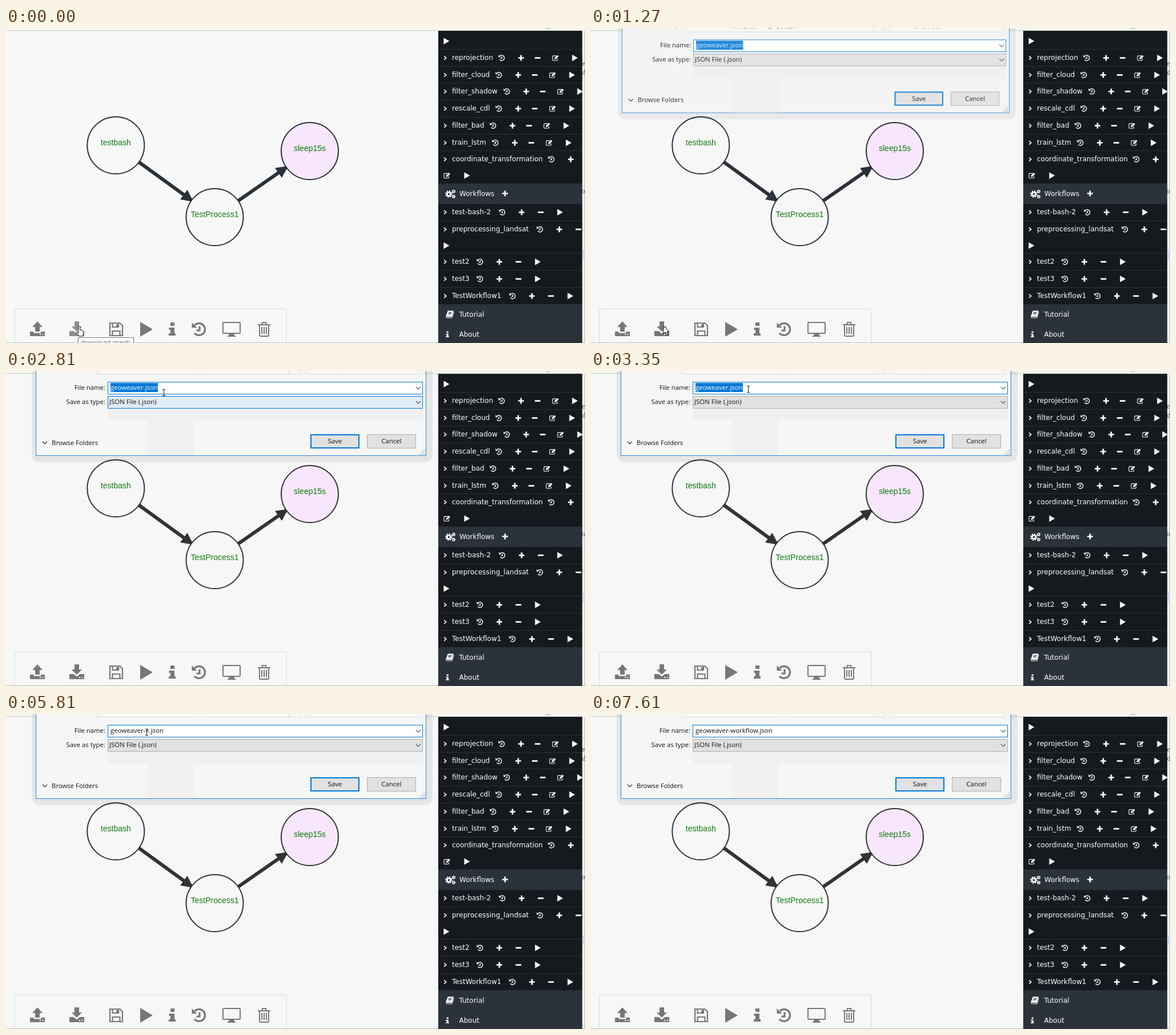
An HTML page with a canvas for the animation above (8 s loop, 1014 by 553 pixels).

```html
<!DOCTYPE html>
<html lang="en">
<head>
<meta charset="utf-8">
<title>Workflow export</title>
<style>
html, body { margin: 0; width: 100%; height: 100%; overflow: hidden; }
canvas { display: block; }
</style>
</head>
<body>
<canvas id="stage" width="1014" height="553"></canvas>
<script>
const ctx = document.getElementById('stage').getContext('2d');
const LOOP = 8000;
const SIDE = '12px "DejaVu Sans", sans-serif';
const DIALOG = '11.4px "Open Sans", "Noto Sans CJK SC", sans-serif';
const NODE = '14px "Liberation Sans", Arial, sans-serif';
const BLUE = '#0078d7';

// Icon shapes about (0,0): f = filled, s = stroked, w = stroke width
const ICONS = {
  play: { f: 'M-10-13L12 0L-10 13Z' },
  plus: { f: 'M-11-3H-3V-11H3V-3H11V3H3V11H-3V3H-11Z' },
  minus: { f: 'M-11-3H11V3H-11Z' },
  info: { f: 'M-3-12H4V-6H-3ZM-5.5-3H4V7H6V11H-6V7H-3V1H-5.5Z' },
  chevron: { s: 'M-4-7L4 0L-4 7', w: 3.6 },
  history: { f: 'M-12.5-12V-3H-3.5Z', s: 'M-7.5-7.4A10.5 10.5 0 1 1-8 6.8M1-5.5V2H-4.5', w: 3.2 },
  edit: { f: 'M8-11L13-6L2 5H-3V0Z', s: 'M4-8H-8Q-11-8-11-5V7Q-11 10-8 10H5Q8 10 8 7V3', w: 2.4 },
  upload: { f: 'M0-14L9-4H4V4H-4V-4H-9ZM-13 4H-6.5V6.5H6.5V4H13V12H-13ZM4 8h2v2h-2zM8.500 8h2v2h-2z' },
  download: { f: 'M-4-14H4V-5H9L0 4L-9-5H-4ZM-13 3H-5.500L0 7.500L5.500 3H13V12H-13ZM4 8h2v2h-2zM8.500 8h2v2h-2z' },
  save: { f: 'M0-9H3V-5H0Z', s: 'M-11-11H6.500L11-6.500V11H-11ZM-6.500 11V3H6.500V11M-6.500-11V-4H4V-11', w: 2.2 },
  desktop: { f: 'M-4 7H4L5 11H7V13H-7V11H-5Z', s: 'M-14-12H14Q15-12 15-11V6Q15 7 14 7H-14Q-15 7-15 6V-11Q-15-12-14-12Z', w: 2 },
  trash: { s: 'M-8-8V10Q-8 12-6 12H6Q8 12 8 10V-8M-11-8H11M-4-8L-3-12H3L4-8M-4-4V8M0-4V8M4-4V8', w: 2 },
  book: { f: 'M-7-15H15L9 9H-10Q-15 9-14 4ZM-4-9L-5-6H8L9-9ZM-6-4L-7-1H6L7-4Z', s: 'M-14 7Q-15 13-10 13H9L16-10', w: 2.2 },
};
for (const icon of Object.values(ICONS)) {
  if (icon.f) icon.f = new Path2D(icon.f);
  if (icon.s) icon.s = new Path2D(icon.s);
}
const ARROW = new Path2D('M0 0V14L3.300 11L5.600 16.500L8 15.400L5.700 10.200H10Z');
const HAND = new Path2D('M4 10V1.500Q5.500-.5 7 1.500V7L12 8.500Q13.500 9 13 12L11.500 18H5L.5 12Q0 9.500 4 12Z');

function rect(x, y, w, h, fill, stroke, line = 1) {
  if (fill) { ctx.fillStyle = fill; ctx.fillRect(x, y, w, h); }
  if (stroke) {
    ctx.strokeStyle = stroke;
    ctx.lineWidth = line;
    ctx.strokeRect(x + line / 2, y + line / 2, w - line, h - line);
  }
}

function text(s, x, y, font, color, align = 'left') {
  ctx.font = font;
  ctx.fillStyle = color;
  ctx.textAlign = align;
  ctx.fillText(s, x, y);
}

function polyline(points, color, width) {
  ctx.beginPath();
  points.forEach(p => ctx.lineTo(...p));
  ctx.strokeStyle = color;
  ctx.lineWidth = width;
  ctx.stroke();
}

function icon(name, x, y, color = '#fff', scale = .45) {
  const { f, s, w } = ICONS[name];
  ctx.save();
  ctx.translate(x, y);
  ctx.scale(scale, scale);
  ctx.fillStyle = ctx.strokeStyle = color;
  ctx.lineWidth = w;
  if (f) ctx.fill(f, 'evenodd');
  if (s) ctx.stroke(s);
  ctx.restore();
}

function gear(x, y, r, teeth) {
  ctx.strokeStyle = '#fff';
  ctx.lineWidth = r * .55;
  ctx.beginPath();
  ctx.arc(x, y, r * .65, 0, 7);
  ctx.stroke();
  ctx.setLineDash([Math.PI * r / teeth]);
  ctx.beginPath();
  ctx.arc(x, y, r, 0, 2 * Math.PI);
  ctx.stroke();
  ctx.setLineDash([]);
}

const NODES = [
  { x: 192.3, y: 206, label: 'testbash' },
  { x: 365.5, y: 332, label: 'TestProcess1' },
  { x: 532, y: 216, label: 'sleep15s', fill: '#f8e7fc' },
];

// Runs from centre to centre; the nodes cover both ends
function link(a, b, color) {
  const d = Math.hypot(b.x - a.x, b.y - a.y), u = (b.x - a.x) / d, v = (b.y - a.y) / d;
  const at = (along, side) => [a.x + u * along - v * side, a.y + v * along + u * side];
  polyline([at(0, 0), at(d, 0)], color, 6);
  ctx.beginPath();
  [at(d - 46, 0), at(d - 67, 10.5), at(d - 67, -10.5)].forEach(p => ctx.lineTo(...p));
  ctx.fillStyle = color;
  ctx.fill();
}

function graph(color, background) {
  link(NODES[0], NODES[1], color);
  link(NODES[1], NODES[2], color);
  for (const { x, y, label, fill = background } of NODES) {
    ctx.beginPath();
    ctx.arc(x, y, 50, 0, 7);
    ctx.fillStyle = fill;
    ctx.fill();
    ctx.strokeStyle = color;
    ctx.lineWidth = 2;
    ctx.stroke();
    text(label, x, y, NODE, '#107a10', 'center');
  }
}

const TOOLS = { upload: 55, download: 124, save: 193, play: 245, info: 291, history: 338, desktop: 395, trash: 452 };

function toolbar(hover) {
  ctx.beginPath();
  ctx.roundRect(15, 493, 476, 80, 3);
  ctx.strokeStyle = '#e6e8e8';
  ctx.lineWidth = 2;
  ctx.stroke();
  for (const name in TOOLS) icon(name, TOOLS[name], 529, hover && name === 'download' ? '#8c8c8c' : '#777', 1);
}

// [label, centre y, x of the history icon]
const PROCESSES = [
  ['reprojection', 52, 868], ['filter_cloud', 82, 863], ['filter_shadow', 111, 877], ['rescale_cdl', 141, 863],
  ['filter_bad', 171, 853], ['train_lstm', 201, 857], ['coordinate_transformation', 230, 955],
];
const WORKFLOWS = [
  ['test-bash-2', 323, 869], ['preprocessing_landsat', 353, 935], ['test2', 410, 830],
  ['test3', 440, 830], ['TestWorkflow1', 470, 887],
];

function sideRow([label, y, x], buttons) {
  rect(757, y - 15, 252, 1, '#2a3038');
  icon('chevron', 769, y + .5);
  text(label, 781, y + 4, SIDE, '#fff');
  icon('history', x, y + .5);
  for (const name in buttons) {
    if (x < 930 || buttons[name] < 70) icon(name, x + buttons[name], y + .5);
  }
}

function sidebar() {
  ctx.save();
  ctx.beginPath();
  ctx.rect(757, 5, 252, 548);
  ctx.clip();
  rect(757, 5, 252, 548, '#161a1f');
  icon('play', 771, 23);
  PROCESSES.forEach(row => sideRow(row, { plus: 34, minus: 63, edit: 94, play: 128 }));
  icon('edit', 772, 259);
  icon('play', 807, 259);
  rect(757, 273, 252, 35, '#2c323a');
  gear(775.5, 291.5, 5, 8);
  gear(784, 287, 2.6, 6);
  gear(784, 296, 2.6, 6);
  text('Workflows', 794, 295, SIDE, '#fff');
  icon('plus', 874, 290.5);
  WORKFLOWS.forEach(row => sideRow(row, { plus: 34, minus: 67.5, play: 101 }));
  icon('play', 771, 382);
  rect(757, 485, 252, 68, '#2c323a');
  icon('book', 777, 503);
  text('Tutorial', 793.5, 507, SIDE, '#fff');
  icon('info', 773, 538);
  text('About', 793.5, 542, SIDE, '#fff');
  ctx.restore();
}

function windowEdges() {
  rect(0, 0, 1014, 4, '#f5f7f5');
  rect(0, 4, 1009, 1, '#c5c8c2');
  rect(946, 0, 7, 1, '#8fb09c');
  rect(1009, 0, 5, 553, '#f3f4f5');
  rect(1009, 5, 1, 548, '#c8cacc');
  rect(1013, 5, 1, 548, '#b5b8ba');
  rect(1010, 389, 4, 16, '#d0d8ee');
  const serif = '12px "Liberation Serif", serif';
  text('e', 1008.5, 66, serif, '#444');
  text('d', 1009, 82, serif, '#444');
  text('or', 1008, 290, serif, '#444');
  rect(0, 552, 1014, 1, '#b9bcbc');
}

const down = (x, y, color) => polyline([[x - 4, y - 2], [x, y + 2], [x + 4, y - 2]], color, 1.1);

function button(label, x, border, line) {
  rect(x, 111, 86, 25, '#e1e1e1', border, line);
  text(label, x + 43, 127, DIALOG, '#111', 'center');
}

function dialog(name, { selected, hover, caret }) {
  ctx.fillStyle = 'rgba(0,0,0,.07)';
  ctx.beginPath();
  ctx.roundRect(45, -30, 702, 190, 14);
  ctx.fill();
  rect(52, -40, 684, 189, '#f6f6f6', '#2a86d4');
  rect(178, 66, 552, 21, '#f0f0f0');
  rect(248, 87, 80, 61, '#f0f0f0');

  rect(159, -19, 337, 25, '#f8f8f8', '#d9d9d9');
  rect(495, -19, 20, 25, '#f8f8f8', '#d9d9d9');
  rect(524, -19, 201, 25, '#f8f8f8', '#d9d9d9');
  rect(165, -12, 13, 10, '#f3cf72');
  text('«  work  ›  工作的文件  ›  参考文献', 184, -1.5, DIALOG, '#111');
  text('Search 参考文献', 530, -1.5, DIALOG, '#777');
  polyline([[149, -12], [149, 0]], '#777', 1.2);

  text('File name:', 174, 33, DIALOG, '#111', 'right');
  text('Save as type:', 174, 58, DIALOG, '#111', 'right');
  rect(178, 19, 552, 22, '#fff', BLUE);
  rect(178, 44, 552, 22, hover ? '#e1ecf6' : '#e1e1e1', hover ? BLUE : '#adadad');
  text('JSON File (.json)', 181, 58, DIALOG, '#111');
  down(722, 30, '#555');
  down(722, 55, '#555');
  if (selected) rect(183, 21, 83, 16, BLUE);
  text(name + '.json', 183, 33, DIALOG, selected ? '#fff' : '#111');
  if (caret) rect(Math.round(183 + ctx.measureText(name).width), 22, 1, 15, '#111');

  button('Save', 533, BLUE, 2);
  button('Cancel', 632, '#adadad', 1);
  down(68, 126, '#222');
  text('Browse Folders', 80, 130, DIALOG, '#111');
  for (let i = 0; i < 3; i++) {
    for (let j = 0; j <= i; j++) rect(731 - j * 3.5, 138 + i * 3.5, 2, 2, '#b8b8b8');
  }
}

// Latest entry whose time has come
const step = (list, t) => list.filter(e => e[0] <= t).pop();

// [ms, scale, opacity]
const OPENING = [[0, 1, 0], [1120, .959, .17], [1270, .993, .86], [1410, 1, 1]];
const TYPED = [[0, ''], [4830, '-'], [5250, '-='], [5960, '-'], [6250, '-w'], [6390, '-wo'],
  [6530, '-wor'], [6660, '-work'], [6790, '-workfl'], [7070, '-workflow']];
// [ms, x, y]
const POINTER = [[0, 127, 523], [1410, 127, 523], [1990, 225, 206], [2110, 230, 185], [2400, 250, 110],
  [2680, 272, 52], [2810, 276, 38], [3110, 276, 32], [3630, 274, 31], [4320, 242, 29], [4830, 246, 32], [8000, 246, 32]];

function pointerAt(t) {
  const i = POINTER.findIndex(p => p[0] > t), [t0, x0, y0] = POINTER[i - 1], [t1, x1, y1] = POINTER[i];
  const k = (t - t0) / (t1 - t0);
  return [x0 + (x1 - x0) * k, y0 + (y1 - y0) * k];
}

function pointer(t) {
  if (t >= 6250) return;
  const [x, y] = pointerAt(t).map(Math.round);
  ctx.save();
  ctx.translate(x, y);
  if (t >= 2780) {
    const color = t > 3800 && t < 4460 ? '#cfe4f7' : '#222';
    polyline([[.5, -5], [.5, 5]], color, 1);
    polyline([[-2, -5.5], [3, -5.5]], color, 1);
    polyline([[-2, 5.5], [3, 5.5]], color, 1);
  } else {
    const shape = t < 280 ? HAND : ARROW;
    if (t < 280) ctx.translate(-4, 0);
    ctx.fillStyle = '#fff';
    ctx.strokeStyle = '#111';
    ctx.lineWidth = 1;
    ctx.fill(shape);
    ctx.stroke(shape);
  }
  ctx.restore();
}

function draw(t) {
  const background = t < 990 ? '#f7f9f8' : '#f7f7f7';
  rect(0, 0, 1014, 553, background);
  graph(t < 1410 ? '#2b303a' : '#333', background);
  toolbar(t < 280);
  windowEdges();

  const [, scale, opacity] = step(OPENING, t);
  if (opacity) {
    ctx.save();
    ctx.globalAlpha = opacity;
    ctx.translate(321, 200);
    ctx.scale(scale, scale);
    ctx.translate(-321, -200);
    dialog('geoweaver' + step(TYPED, t)[1], {
      selected: t < 4460,
      hover: t >= 2540 && t < 3230,
      caret: t >= 6250 && t < 7610,
    });
    ctx.restore();
  }
  sidebar();

  if (t < 280) {
    rect(126, 543, 98, 20, '#fff', '#777');
    text('download graph', 131, 556, DIALOG, '#666');
  }
  pointer(t);
}

const start = performance.now();
function tick() {
  draw((performance.now() - start) % LOOP);
  requestAnimationFrame(tick);
}
tick();
</script>
</body>
</html>
```
